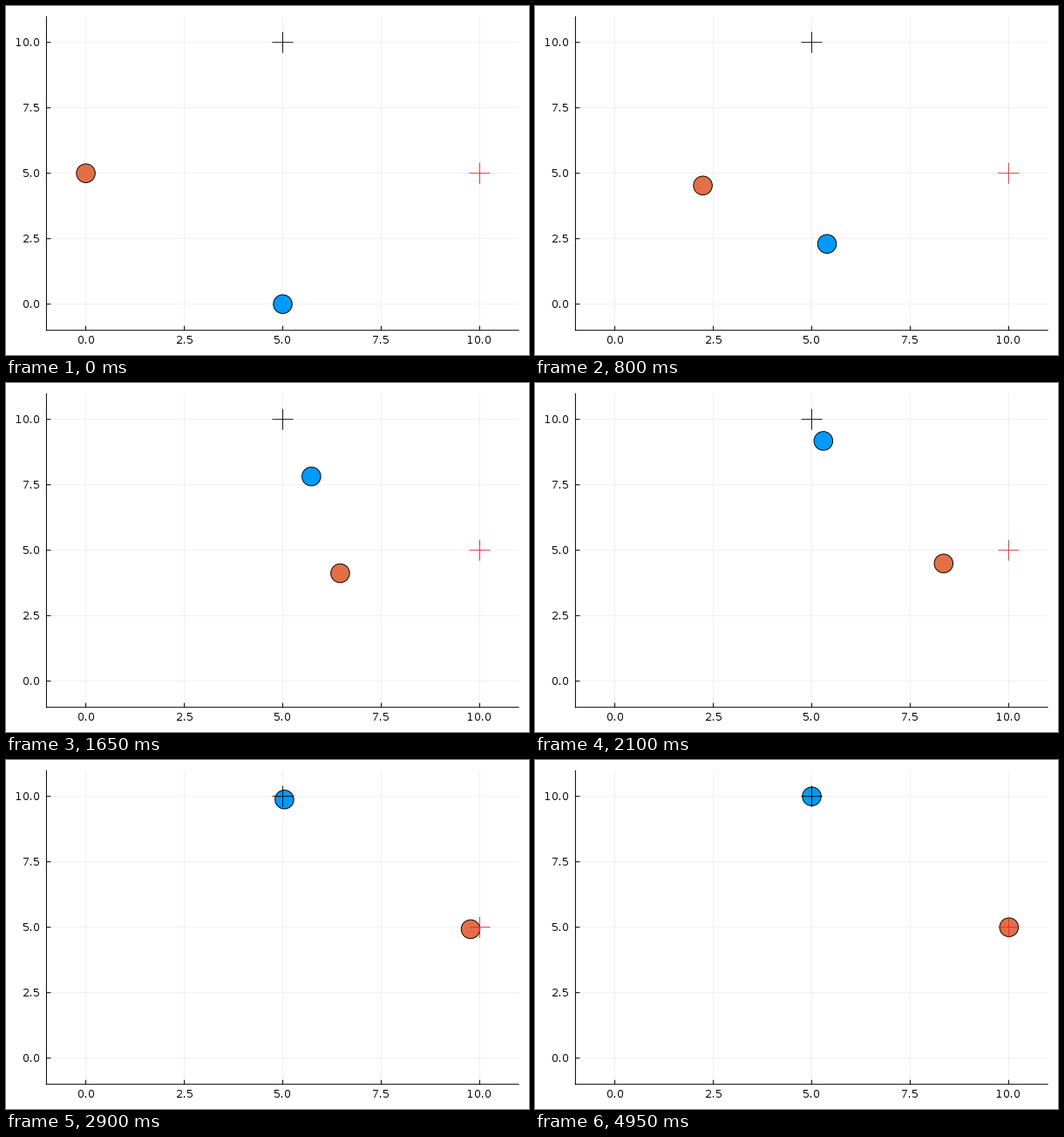
These frames come from a looping animation (600x400 px, 5000 ms). A matplotlib script:

```python
import numpy as np
import matplotlib.pyplot as plt
from matplotlib.animation import FuncAnimation
from matplotlib.patches import Circle

W, H, DPI = 600, 400, 100
FRAMES, INTERVAL = 100, 50
LEFT, RIGHT, TOP, BOTTOM = 46.4, 588.6, 11.7, 371.7
TICKS = np.arange(0, 10.1, 2.5)
BLUE, ORANGE = "#009afa", "#e36f47"
STEP = 14      # ticks between the key points of a path
DECAY = 0.121  # share of the remaining gap closed per tick when homing in

plt.rcParams.update({
    "font.family": "DejaVu Sans",
    "text.hinting": "default",
    "text.hinting_factor": 1,
    "path.snap": False,
})


def pt(px):
    return px * 72 / DPI


def to_px(x, y):
    return (LEFT + (x + 1) * (RIGHT - LEFT) / 12,
            BOTTOM - (y + 1) * (BOTTOM - TOP) / 12)


def path(start, pass_in, pass_out, homing, goal):
    """Smooth swerve from rest through evenly timed points, then exponential homing."""
    p = np.array([start, pass_in, pass_out, homing], float)
    gap = np.array(goal) - p[3]
    v = np.zeros_like(p)
    v[3] = DECAY * STEP * gap
    slopes = 3 * (p[2:] - p[:2]) - np.array([v[0], v[3]])
    v[1:3] = np.linalg.solve([[4, 1], [1, 4]], slopes)

    def at(tick):
        i, u = divmod(tick / STEP, 1)
        if i >= 3:
            return goal - gap * np.exp(-DECAY * (tick - 3 * STEP))
        i = int(i)
        ease = u * u * (3 - 2 * u)
        return (p[i] + (p[i + 1] - p[i]) * ease
                + u * (1 - u) * (v[i] * (1 - u) - v[i + 1] * u))
    return at


fig = plt.figure(figsize=(W / DPI, H / DPI), dpi=DPI, facecolor="white")
ax = fig.add_axes([0, 0, 1, 1])
ax.set_xlim(0, W)
ax.set_ylim(H, 0)
ax.axis("off")


def line(x0, y0, x1, y1, color="black", width=1.0, z=2, **kw):
    ax.plot([x0, x1], [y0, y1], color=color, lw=pt(width), zorder=z,
            solid_capstyle="butt", **kw)


def label(x, y, value, ha):
    ax.text(x, y + 4.4, f"{value:.1f}", ha=ha, va="baseline", fontsize=pt(12))


def cross(x, y, color):
    px, py = to_px(x, y)
    line(px - 12, py, px + 12, py, color, 0.9, 5)
    line(px, py - 12, px, py + 12, color, 0.9, 5)


def ball(color):
    return ax.add_patch(Circle((0, 0), 10.75, facecolor=color,
                               edgecolor="black", lw=pt(0.95), zorder=4))


for v in TICKS:
    px, py = to_px(v, v)
    line(px, TOP, px, BOTTOM, z=1, alpha=0.06)
    line(LEFT, py, RIGHT, py, z=1, alpha=0.06)
    line(px, BOTTOM, px, BOTTOM - 5)
    line(LEFT, py, LEFT + 5, py)
    label(px, 383, v, "center")
    label(38.8, py, v, "right")
line(LEFT, TOP, LEFT, BOTTOM + 0.5)
line(LEFT - 0.5, BOTTOM, RIGHT, BOTTOM)

cross(5, 10, "black")
cross(10, 5, "#e8262a")

agents = [
    (ball(BLUE), path((5, 0), (5.34, 2), (5.83, 6.8), (5.26, 9.27), (5, 10))),
    (ball(ORANGE), path((0, 5), (2, 4.58), (5.5, 4.08), (8.53, 4.55), (10.01, 5))),
]


def update(k):
    tick = max(k - 1, 0)  # the opening pose is held for two ticks
    for disc, position in agents:
        disc.center = to_px(*position(tick))
    return [disc for disc, _ in agents]


anim = FuncAnimation(fig, update, frames=FRAMES, interval=INTERVAL,
                     init_func=lambda: update(0), repeat=True, repeat_delay=0)
plt.show()
```
